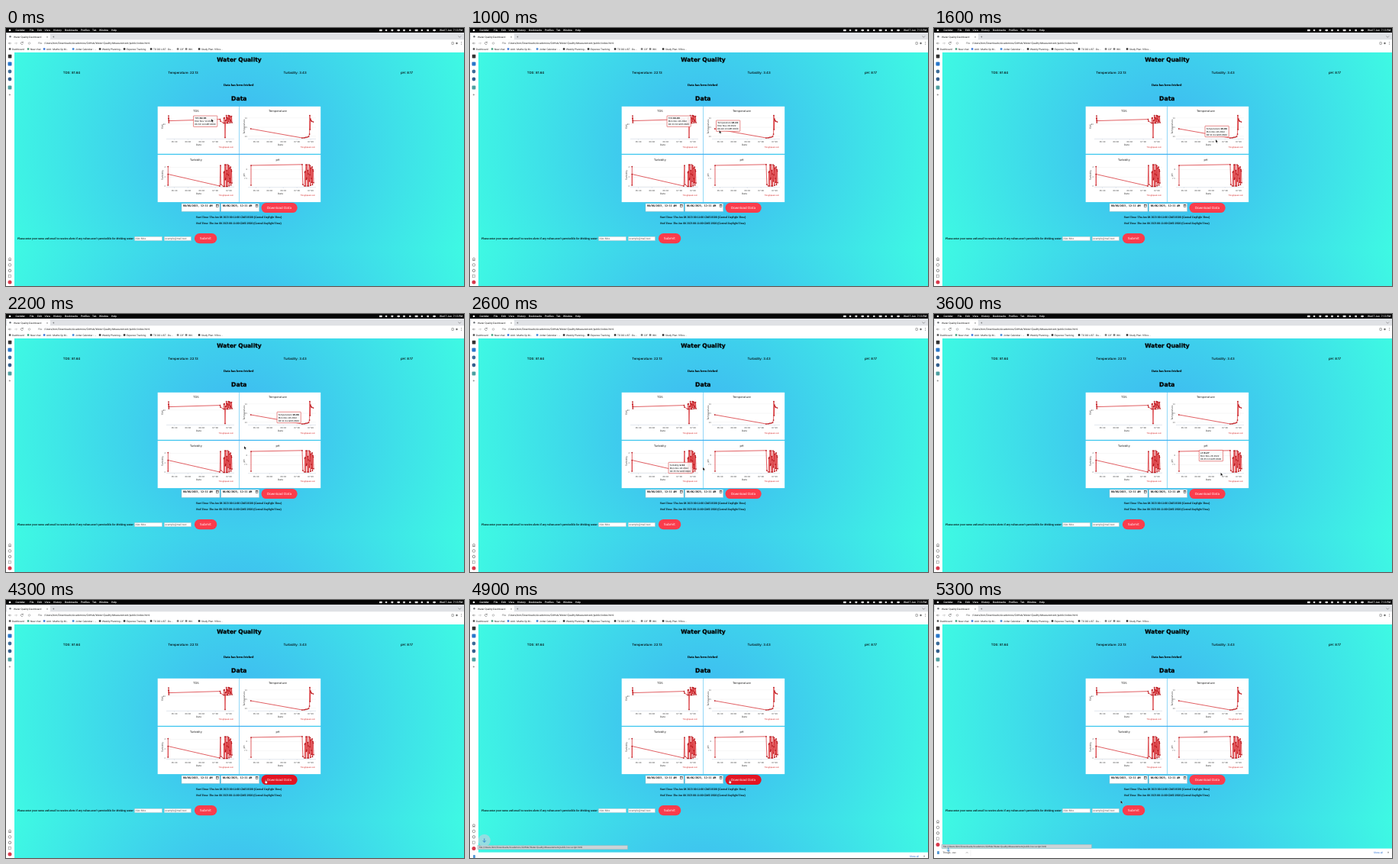
Write an HTML page that moves like this. It is 600 by 338 pixels and loops after 5400 ms.

```html
<!DOCTYPE html>
<html lang="en">
<head>
<meta charset="utf-8">
<title>Water Quality Dashboard</title>
<style>
html, body { margin: 0; width: 100%; height: 100%; overflow: hidden; background: #fff; }
svg { display: block; width: 100%; height: 100%; text-rendering: geometricPrecision; }
text { font-family: Roboto, Arial, sans-serif; white-space: pre; }
.head { font-family: "DejaVu Sans", sans-serif; }
.title { font-weight: 700; stroke: #000; stroke-width: 0.25px; }
.geo { font-family: Inter, sans-serif; font-weight: 500; }
.serif { font-family: "Liberation Serif", serif; stroke: #000; stroke-width: 0.08px; }
.mono { font-family: "DejaVu Sans Mono", monospace; stroke: #000; stroke-width: 0.1px; }
.chart { font-family: "DejaVu Sans", sans-serif; }
</style>
</head>
<body>
<svg id="stage" viewBox="0 0 600 338">
  <defs>
    <radialGradient id="glow" gradientUnits="userSpaceOnUse" cx="294.5" cy="128.5" r="321">
      <stop offset="0" stop-color="#3eb3f3"/>
      <stop offset="1" stop-color="#3ef9e3"/>
    </radialGradient>
    <pattern id="sea" patternUnits="userSpaceOnUse" x="11" y="32" width="589" height="257">
      <rect width="589" height="257" fill="url(#glow)"/>
    </pattern>
  </defs>
</svg>
<script>
const stage = document.getElementById('stage');

function add(parent, tag, attrs = {}) {
  const el = document.createElementNS('http://www.w3.org/2000/svg', tag);
  for (const key in attrs) el.setAttribute(key, attrs[key]);
  parent.appendChild(el);
  return el;
}
const group = (parent = stage) => add(parent, 'g');
const rect = (p, x, y, width, height, fill, more) =>
  add(p, 'rect', { x, y, width, height, fill, ...more });
const dot = (p, cx, cy, r, fill, more) => add(p, 'circle', { cx, cy, r, fill, ...more });
const line = (p, d, stroke, width = 0.5, more) =>
  add(p, 'path', { d, stroke, 'stroke-width': width, fill: 'none', ...more });
function text(p, x, y, str, size, fill = '#222', more) {
  const el = add(p, 'text', { x, y, 'font-size': size, fill, ...more });
  el.textContent = str;
  return el;
}
const middle = { 'text-anchor': 'middle' };

function drawBrowser() {
  const g = group();
  rect(g, 0, 0, 600, 6, '#050505');
  dot(g, 5, 3, 1.3, '#fff');
  text(g, 12.5, 4.2, 'Corridor', 3.3, '#fff', { 'font-weight': 700 });
  const menus = [[31, 'File'], [41, 'Edit'], [50.5, 'View'], [62, 'History'], [77, 'Bookmarks'],
    [98, 'Profiles'], [113, 'Tab'], [122, 'Window'], [138, 'Help']];
  for (const [x, s] of menus) text(g, x, 4.2, s, 3.4, '#fff', { 'font-weight': 500 });
  for (let i = 0; i < 10; i++) {
    rect(g, 489 + i * 7.8, 1.8, i % 3 ? 2.6 : 3.8, 2.5, '#ddd', { rx: i % 2 ? 1.2 : 0.4 });
  }
  text(g, 568, 4.2, 'Wed 7 Jun  7:13 PM', 3.4, '#fff', { 'font-weight': 500 });

  rect(g, 0, 6, 600, 9.5, '#dfe1e5');
  rect(g, 1, 7.2, 57, 8.3, '#fff', { rx: 1.5 });
  dot(g, 5.5, 11.3, 1.2, '#70757a');
  text(g, 10, 12.5, 'Water Quality Dashboard', 3.3);
  text(g, 53, 12.6, '×', 3.8, '#444');
  text(g, 61, 12.8, '+', 4.2, '#444');
  line(g, 'M592.5 10.5l1.8 1.8 1.8-1.8', '#555');

  rect(g, 0, 15.5, 600, 16.5, '#fff');
  line(g, 'M7 20H3.5m1.4-1.4L3.5 20l1.4 1.4', '#555');
  line(g, 'M11 20h3.5m-1.4-1.4l1.4 1.4-1.4 1.4', '#aaa');
  line(g, 'M22.2 19a1.6 1.6 0 1 0 .2 1.6M22.4 17.8v1.4h-1.4', '#555');
  dot(g, 30.5, 20, 1.3, 'none', { stroke: '#666', 'stroke-width': 0.4 });
  text(g, 42, 21.2, 'File', 3.3, '#555');
  text(g, 50, 21.2,
    '/Users/kim/Downloads/Academics/GitHub/Water-Quality-Measurement/public/index.html', 3.45);
  rect(g, 584, 18.8, 2.4, 2.4, 'none', { stroke: '#555', 'stroke-width': 0.5 });
  dot(g, 590.5, 20, 1.2, '#666');
  line(g, 'M596.5 18.3v3.4', '#555', 0.7, { 'stroke-dasharray': '0.7 0.65' });

  const marks = [[8, 'Dashboard', '#555'], [32, 'New chat', '#4aa081'],
    [53, 'Add - Maths Sp M...', '#3d78d8'], [91, 'Jotter Calendar - ...', '#4285d4'],
    [126, 'Weekly Planning...', '#333'], [158, 'Expense Tracking', '#333'],
    [193, 'TO DO LIST - Du...', '#333'], [228, 'CIF', '#777'], [239, 'INV', '#777'],
    [256, 'Study Plan: 9 Box...', '#333']];
  for (const [x, s, c] of marks) {
    rect(g, x - 4.2, 26.2, 2.6, 2.6, c, { rx: 0.5 });
    text(g, x, 28.6, s, 3.25);
  }

  rect(g, 0, 31, 11, 307, '#fff');
  rect(g, 2.8, 34.8, 4.6, 4.6, '#333', { rx: 0.7 });
  rect(g, 2.5, 44.5, 5, 5, '#2876c9', { rx: 1 });
  dot(g, 5, 57, 2.4, '#3c6c98');
  dot(g, 5, 67, 2.4, '#335f8d');
  rect(g, 2.6, 75.6, 4.8, 4.8, '#4c9fa0', { rx: 1 });
  text(g, 5, 89, '+', 5, '#555', middle);
}

function pill(p, x, y, w, h, label, labelX, labelY) {
  const shape = rect(p, x, y, w, h, '#fb3c4c', { rx: h / 2 });
  text(p, labelX, labelY, label, 4.2, '#fff', { class: 'head', ...middle });
  return shape;
}

function drawPage() {
  const g = group();
  rect(g, 11, 32, 589, 306, 'url(#sea)');
  const title = { class: 'head title', ...middle };
  text(g, 305.5, 44, 'Water Quality', 7.5, '#000', title);
  text(g, 305.3, 95, 'Data', 7.7, '#000', title);
  const readings = [[86, 'TDS: 81.64'], [232, 'Temperature: 22.13'],
    [378.5, 'Turbidity: 3.43'], [525, 'pH: 8.17']];
  for (const [x, s] of readings) text(g, x, 60, s, 4.3, '#000', { class: 'geo', ...middle });
  const serif = { class: 'serif' }, center = { ...serif, ...middle };
  text(g, 304.7, 75.6, 'Data has been fetched', 4.2, '#000', { ...center, 'font-weight': 700 });
  const stamp = ' Time: Thu Jun 08 2023 00:11:00 GMT-0500 (Central Daylight Time)';
  text(g, 305, 248.5, 'Start' + stamp, 3.78, '#000', center);
  text(g, 305, 256.5, 'End' + stamp, 3.78, '#000', center);
  text(g, 15, 277.1, 'Please enter your name and email to receive alerts if any values ' +
    "aren't permissible for drinking water:", 3.78, '#000', serif);

  const border = { stroke: '#a3b4ba', 'stroke-width': 0.4 };
  for (const x of [230, 281.7]) {
    rect(g, x, 230, 50, 10.4, '#fff', border);
    text(g, x + 2, 234.2, '08/06/2023, 12:11 AM', 3.2, '#000', { class: 'mono' });
    rect(g, x + 45.5, 231.6, 2.7, 2.7, 'none', { stroke: '#222', 'stroke-width': 0.5 });
    line(g, `M${x + 45.5} 232h2.7`, '#222', 0.7);
  }
  [[168.5, 36, 'Alex Moe'], [207.3, 35.2, 'example@mail.test']].forEach(([x, w, s]) => {
    rect(g, x, 273.3, w, 5.3, '#fff', border);
    text(g, x + 1, 276.9, s, 3.3, '#555');
  });
  pill(g, 246.9, 269.1, 29.4, 13.2, 'Submit', 261.5, 277.1);
  return pill(g, 334.5, 229.1, 47.2, 13, 'Download Data', 358, 237.1);
}

// Dense zigzag between two heights, used for the busy right end of each series
function burst(x0, x1, count, low, high) {
  return Array.from({ length: count }, (_, i) => {
    const wave = Math.sin(i * 2.4 + 1) * (0.85 + 0.25 * Math.cos(i * 1.7));
    const k = Math.max(-1, Math.min(1, wave * 1.3));
    return [x0 + (x1 - x0) * i / (count - 1), (low + high) / 2 + k * (high - low) / 2];
  });
}

function drawChart(x, y, name, ticks, points) {
  const g = group();
  const label = { class: 'chart', ...middle };
  rect(g, x - 0.3, y - 0.4, 106.5, 62, '#fff');
  text(g, x + 50, y + 7, name, 3.7, '#222', label);
  for (const [dy, s] of ticks) {
    line(g, `M${x + 11} ${y + dy}h89`, '#e4e4e4', 0.3);
    text(g, x + 10, y + dy + 0.9, s, 2.5, '#555', { class: 'chart', 'text-anchor': 'end' });
  }
  line(g, `M${x + 11} ${y + 42.2}h89`, '#b8c4d4', 0.4);
  ['05:30', '06:00', '06:30', '07:00', '07:30'].forEach((s, i) => {
    const tx = x + 21.5 + i * 17.9;
    line(g, `M${tx} ${y + 42.2}v1.3`, '#b8c4d4', 0.4);
    text(g, tx, y + 47.2, s, 2.7, '#444', label);
  });
  text(g, x + 53.5, y + 51.2, 'Date', 3, '#333', label);
  text(g, x + 99, y + 53.3, 'ThingSpeak.com', 2.6, '#d62020', { 'text-anchor': 'end' });
  text(g, 0, 0, name, 3, '#333', { ...label, transform: `translate(${x + 6.6} ${y + 26}) rotate(-90)` });
  line(g, 'M' + points.map(p => p.join(' ')).join('L'), '#d51c22', 0.7, { 'stroke-linejoin': 'round' });
  for (const [px, py] of points) dot(g, px, py, 0.85, '#b5141a');
}

function drawCharts() {
  const tds = burst(285, 296, 22, 114.5, 124.5);
  tds[4] = [287, 143.5];
  drawChart(199, 103.2, 'TDS', [[22.5, '80']],
    [[213, 115], [213.4, 124], [213, 118], [213.4, 121.6], [280.5, 119.6], [281, 122], ...tds]);
  drawChart(306, 103.2, 'Temperature', [[14.5, '30'], [27, '25'], [38.5, '20']],
    [[320.7, 132], [388, 144], [390.5, 143.8], [392.5, 143.4], [394.5, 143], [396.5, 142.3],
      [397.6, 139], [398, 114.5], [398.4, 133], [398.9, 119], [399.5, 121], [400.5, 122.2], [402.5, 123]]);
  drawChart(199, 166.5, 'Turbidity', [[16, '4'], [29, '2'], [41, '0']],
    [[212.3, 181.5], [212.3, 206], [212.3, 191.5], [280, 207], [281, 180], [281.6, 205],
      ...burst(285, 296, 25, 179, 207.5)]);
  drawChart(306, 166.5, 'pH', [[19, '8'], [31, '7.5']],
    [[321, 206], [321, 180], [388, 178.8], [388.8, 205], ...burst(391, 403, 25, 179, 207)]);
}

// [from, to, x, y, name, value, day, time]
const tips = [
  [0, 300, 245.5, 115, 'TDS', '82.65', 14, '06:33:14'],
  [300, 1300, 258, 115, 'TDS', '82.83', 28, '06:33:33'],
  [700, 1400, 322.5, 121, 'Temperature', '24.22', 28, '06:18:13'],
  [1400, 2500, 355, 128.3, 'Temperature', '19.06', 28, '06:11:11'],
  [2400, 3300, 260, 194.3, 'Turbidity', '1.53', 28, '06:35:52'],
  [2800, 3900, 347.3, 178.4, 'pH', '8.27', 28, '06:35:13']
];

function drawTip([, , x, y, name, value, day, time]) {
  const g = group();
  rect(g, x, y, 31.3, 14.4, '#fafafa', { rx: 0.6, 'fill-opacity': 0.9, stroke: '#d62020', 'stroke-width': 0.5 });
  const first = text(g, x + 1.8, y + 4.4, name + ':', 2.75, '#111', { class: 'chart' });
  add(first, 'tspan', { 'font-weight': 700 }).textContent = value;
  text(g, x + 1.8, y + 8.3, `Mon Nov ${day} 2022`, 2.75, '#111', { class: 'chart' });
  text(g, x + 1.8, y + 12.2, time + ' GMT-0600', 2.75, '#111', { class: 'chart' });
  return g;
}

function drawSideTools() {
  const g = group();
  dot(g, 5, 302.6, 1.5, 'none', { stroke: '#444', 'stroke-width': 0.5 });
  line(g, 'M3 304.4h4', '#444');
  dot(g, 5, 310.4, 1.8, 'none', { stroke: '#444', 'stroke-width': 0.5 });
  dot(g, 5, 317.8, 1.7, 'none', { stroke: '#444', 'stroke-width': 0.6 });
  rect(g, 3.3, 323.4, 3.4, 3.4, 'none', { stroke: '#777', 'stroke-width': 0.5 });
  dot(g, 5, 333, 2.5, '#d8394b');
  return g;
}

function drawShelf() {
  const g = group();
  rect(g, 0, 0, 600, 13, '#fff');
  rect(g, 4, 3.4, 3, 4, '#5b9bd5', { rx: 0.4 });
  text(g, 576, 6.4, 'Show all', 3.2, '#1a66d0');
  text(g, 594, 6.8, '×', 4.2, '#444');
  const item = group(g);
  text(item, 11.5, 6.4, 'ThingS...csv', 3.2);
  line(item, 'M42 6l1.2-1.2L44.4 6', '#555');
  line(item, 'M48 2v8', '#ddd', 0.4);
  return { g, item };
}

function drawStatus() {
  const g = group();
  rect(g, 10, 0, 196.5, 5.2, '#cbd3d7', { stroke: '#9caab0', 'stroke-width': 0.4 });
  text(g, 12, 3.8, 'file:///Users/kim/Downloads/Academics/GitHub/Water-Quality-Measurement/public/csv-script.html',
    3.05, '#333');
  return g;
}

function drawBadge() {
  const g = group();
  const disc = dot(g, 0, 0, 8, '#b0d6e0');
  line(g, 'M0 -2.6V2.2M-2 .3L0 2.4 2 .3', '#2e83cf', 0.9);
  return { g, disc };
}

// [ms, x, y]
const track = [[0, 269, 119], [300, 284, 119], [500, 294, 119], [700, 311, 127], [1000, 326.5, 134],
  [1400, 386, 140], [1800, 352, 152], [2200, 312, 173], [2500, 290, 202], [2800, 335, 198],
  [3000, 378.5, 196.5], [3500, 384, 200], [3900, 350, 231], [4200, 339.5, 235.5],
  [4900, 339.5, 235.5], [5300, 244.5, 262.5], [5400, 244.5, 262.5]];

function pointerAt(t) {
  const i = track.findIndex(p => p[0] > t);
  const [t0, x0, y0] = track[i - 1], [t1, x1, y1] = track[i];
  const k = (t - t0) / (t1 - t0);
  return [x0 + (x1 - x0) * k, y0 + (y1 - y0) * k];
}

const button = drawPage();
drawCharts();
const tipNodes = tips.map(drawTip);
drawBrowser();
const tools = drawSideTools();
const shelf = drawShelf();
const status = drawStatus();
const badge = drawBadge();
const cursor = group();
const arrow = add(cursor, 'path', { d: 'M0 0V4.2L1 3.3 1.7 4.8 2.4 4.5 1.8 3.1H3Z',
  fill: '#000', stroke: '#fff', 'stroke-width': 0.3 });
const hand = add(cursor, 'path', { d: 'M.2 0h.8v1.7l1.8.5v1.5L2.2 5H.6L-.8 3.1l.4-.5.6.4Z',
  fill: '#fff', stroke: '#222', 'stroke-width': 0.25 });

const show = (el, on) => el.setAttribute('display', on ? 'inline' : 'none');
const move = (el, x, y) => el.setAttribute('transform', `translate(${x} ${y})`);

function render(t) {
  const [x, y] = pointerAt(t);
  const hover = t >= 3900 && t < 5000;
  move(cursor, x, y);
  show(arrow, !hover);
  show(hand, hover);
  button.setAttribute('fill', hover ? '#e31422' : '#fb3c4c');
  tips.forEach(([from, to], i) => show(tipNodes[i], t >= from && t < to));

  const open = t >= 4800;
  const height = open ? Math.min(12.4, 2.8 + (t - 4800) * 0.046) : 0;
  move(tools, 0, -height);
  move(shelf.g, 0, 338 - height);
  move(status, 0, Math.min(321.6, 338 - height - 5.4));
  move(badge.g, 18.8, 312 + (t - 4800) * 0.03);
  badge.disc.setAttribute('opacity', Math.max(0, 0.75 - Math.max(0, t - 4900) / 400));
  for (const el of [shelf.g, status, badge.g]) show(el, open);
  show(shelf.item, t >= 5000);
}

const start = performance.now();
function tick() {
  const t = (performance.now() - start) % 5400;
  render(Math.floor(t / 100) * 100);
  requestAnimationFrame(tick);
}
tick();
</script>
</body>
</html>
```
